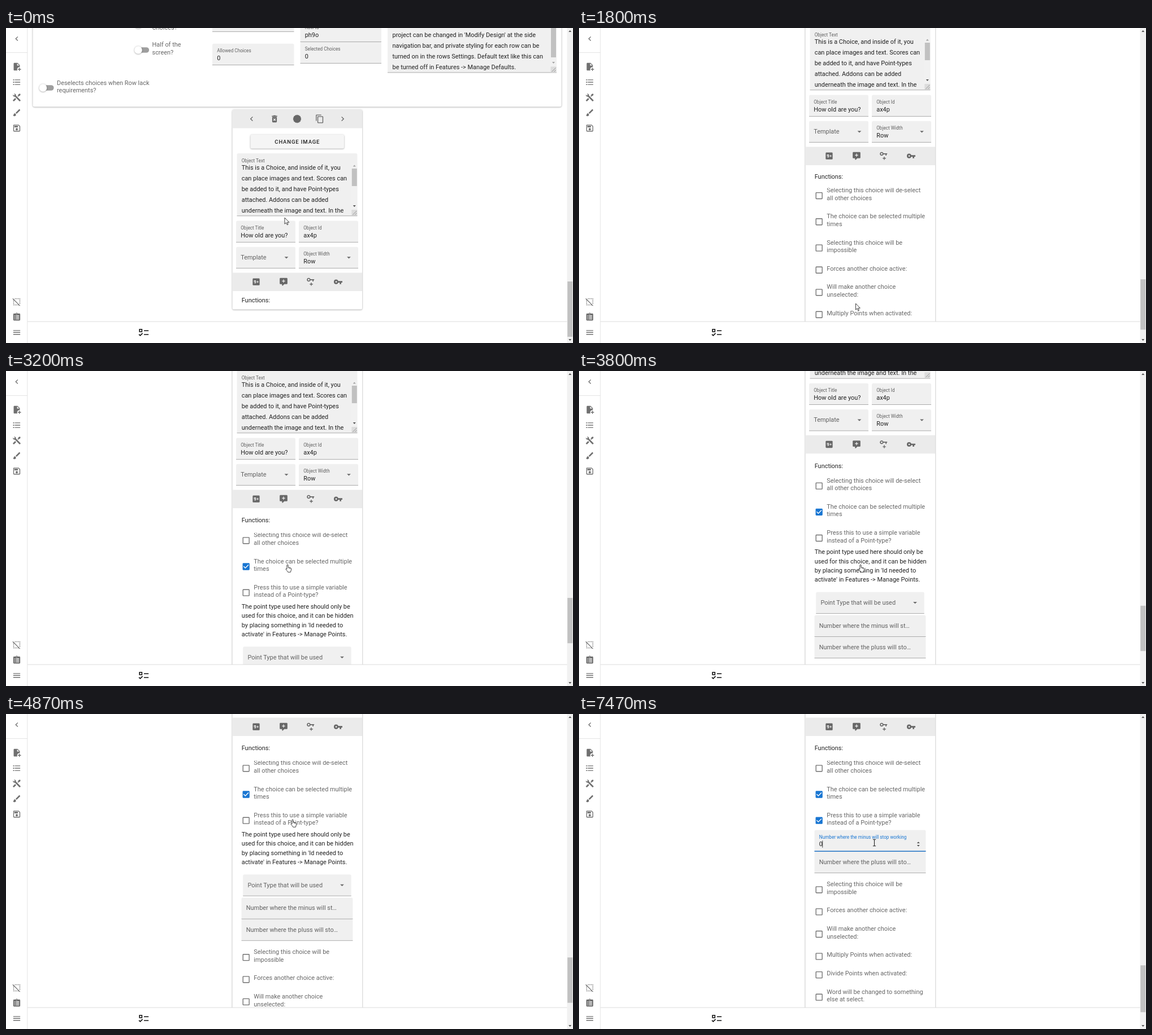
These frames come from a looping animation (1003 by 558 pixels, 8 s). An HTML page:

```html
<!DOCTYPE html>
<html lang="en">
<head>
<meta charset="utf-8">
<title>Choice editor</title>
<style>
html, body { margin: 0; width: 100%; height: 100%; overflow: hidden; background: #fff; }
svg { display: block; font-family: Roboto, Arial, sans-serif; font-size: 10.93px; }
text { fill: rgba(0,0,0,.87); white-space: pre; }
.grey { fill: rgba(0,0,0,.6); }
.small { font-size: 8.2px; }
.icon { fill: rgba(0,0,0,.56); }
.fill { fill: rgba(0,0,0,.06); }
.rule { fill: rgba(0,0,0,.42); }
.bar { fill: #ebebeb; }
.thumb { fill: #c1c1c1; }
.card { fill: #fff; filter: drop-shadow(0 1.2px 1px rgba(0,0,0,.2)) drop-shadow(0 .5px 1.6px rgba(0,0,0,.2)); }
.button { fill: #f5f5f5; filter: drop-shadow(0 1.2px 1px rgba(0,0,0,.22)) drop-shadow(0 .5px 1.6px rgba(0,0,0,.14)); }
</style>
</head>
<body>
<svg id="stage" width="1003" height="558" viewBox="0 0 1003 558"></svg>
<script>
const LOOP = 8000, STEP = 1000 / 15;
const BLUE = '#1976d2';

const ICONS = {
  left: 'M15.41 16.58L10.83 12L15.41 7.41L14 6L8 12L14 18Z',
  right: 'M8.59 16.58L13.17 12L8.59 7.41L10 6L16 12L10 18Z',
  filePlus: 'M14 2H6C4.89 2 4 2.89 4 4V20C4 21.11 4.89 22 6 22H13.81C13.28 21.09 13 20.05 13 19C13 15.69 15.69 13 19 13C19.34 13 19.67 13.03 20 13.08V8L14 2M13 9V3.5L18.5 9H13M23 20H20V23H18V20H15V18H18V15H20V18H23V20Z',
  list: 'M7 5H21V7H7ZM7 11H21V13H7ZM7 17H21V19H7ZM2.6 4.6H5.4V7.4H2.6ZM2.6 10.6H5.4V13.4H2.6ZM2.6 16.6H5.4V19.4H2.6Z',
  tools: 'M21.71 20.29L20.29 21.71A1 1 0 0 1 18.88 21.71L7 9.85A3.81 3.81 0 0 1 6 10A4 4 0 0 1 2.22 4.7L4.76 7.24L7.24 4.76L4.7 2.22A4 4 0 0 1 10 6A3.81 3.81 0 0 1 9.85 7L21.71 18.88A1 1 0 0 1 21.71 20.29M2.29 18.88A1 1 0 0 0 2.29 20.29L3.71 21.71A1 1 0 0 0 5.12 21.71L10.59 16.25L7.76 13.42M20 2L16 4V6L13.83 8.17L15.83 10.17L18 8H20L22 4Z',
  brush: 'M20.71 4.63L19.37 3.29C19 2.9 18.35 2.9 17.96 3.29L9 12.25L11.75 15L20.71 6.04C21.1 5.65 21.1 5 20.71 4.63M7 14A3 3 0 0 0 4 17C4 18.31 2.84 19 2 19C2.92 20.22 4.5 21 6 21A4 4 0 0 0 10 17A3 3 0 0 0 7 14Z',
  save: 'M17 3H5C3.89 3 3 3.9 3 5V19C3 20.1 3.89 21 5 21H19C20.1 21 21 20.1 21 19V7L17 3M19 19H5V5H16.17L19 7.83V19M12 12A3 3 0 0 0 12 18A3 3 0 0 0 12 12M6 6H15V10H6Z',
  selectOff: 'M1 4.27L2.28 3L21 21.72L19.73 23L17 20.27V21H15V19H15.73L5 8.27V9H3V7H3.73ZM20 3A1 1 0 0 1 21 4V5H19V3ZM15 3H17V5H15ZM11 3H13V5H11ZM7 3H9V5H7ZM11 19H13V21H11ZM7 19H9V21H7ZM4 21A1 1 0 0 1 3 20V19H5V21ZM3 15H5V17H3ZM19 15H21V17H19ZM3 11H5V13H3ZM19 11H21V13H19ZM19 7H21V9H19Z',
  clipboard: 'M19 3H14.82C14.4 1.84 13.3 1 12 1S9.6 1.84 9.18 3H5C3.9 3 3 3.9 3 5V19C3 20.1 3.9 21 5 21H19C20.1 21 21 20.1 21 19V5C21 3.9 20.1 3 19 3M12 3A1 1 0 0 1 12 5A1 1 0 0 1 12 3M6 8H8V10H6ZM10 8H18V10H10ZM6 12H8V14H6ZM10 12H18V14H10ZM6 16H8V18H6ZM10 16H18V18H10Z',
  menu: 'M3 6H21V8H3ZM3 11H21V13H3ZM3 16H21V18H3Z',
  remove: 'M6 19A2 2 0 0 0 8 21H16A2 2 0 0 0 18 19V7H6V19M8.46 11.88L9.87 10.47L12 12.59L14.12 10.47L15.53 11.88L13.41 14L15.53 16.12L14.12 17.53L12 15.41L9.88 17.53L8.47 16.12L10.59 14ZM15.5 4L14.5 3H9.5L8.5 4H5V6H19V4Z',
  copy: 'M19 21H8V7H19M19 5H8A2 2 0 0 0 6 7V21A2 2 0 0 0 8 23H19A2 2 0 0 0 21 21V7A2 2 0 0 0 19 5M16 1H4A2 2 0 0 0 2 3V17H4V3H16Z',
  ninePlus: 'M5 3H19A2 2 0 0 1 21 5V19A2 2 0 0 1 19 21H5A2 2 0 0 1 3 19V5A2 2 0 0 1 5 3Z',
  comment: 'M9 22A1 1 0 0 1 8 21V18H4A2 2 0 0 1 2 16V4C2 2.89 2.9 2 4 2H20A2 2 0 0 1 22 4V16A2 2 0 0 1 20 18H13.9L10.2 21.71C10 21.9 9.75 22 9.5 22H9M11 6V9H8V11H11V14H13V11H16V9H13V6Z',
  key: 'M7 14A2 2 0 0 1 7 10A2 2 0 0 1 7 14M12.6 10C11.8 7.7 9.6 6 7 6A6 6 0 0 0 7 18C9.6 18 11.8 16.3 12.6 14H16V18H20V14H23V10Z',
  down: 'M7 10L12 15L17 10Z',
  box: 'M19 3H5A2 2 0 0 0 3 5V19A2 2 0 0 0 5 21H19A2 2 0 0 0 21 19V5A2 2 0 0 0 19 3M19 5V19H5V5Z',
  ticked: 'M10 17L5 12L6.41 10.58L10 14.17L17.59 6.58L19 8ZM19 3H5A2 2 0 0 0 3 5V19A2 2 0 0 0 5 21H19A2 2 0 0 0 21 19V5A2 2 0 0 0 19 3Z'
};
ICONS.seal = 'M' + Array.from({ length: 28 }, (_, i) => {
  const a = i * Math.PI / 14, r = i % 2 ? 9.6 : 11;
  return (12 + r * Math.sin(a)).toFixed(2) + ' ' + (12 - r * Math.cos(a)).toFixed(2);
}).join('L') + 'Z';

// Drawing helpers; text and icons are placed by their vertical centre
const rect = (x, y, w, h, cls, more = '') => `<rect x="${x}" y="${y}" width="${w}" height="${h}" class="${cls}" ${more}/>`;
const text = (x, y, s, cls = '', more = '') =>
  `<text x="${x}" y="${y + (cls.includes('small') ? 2.9 : 3.8)}" class="${cls}" ${more}>${s.replace(/>/g, '&gt;')}</text>`;
const lines = (x, y, gap, list, cls) => list.map((s, i) => text(x, y + i * gap, s, cls)).join('');
const place = (x, y, inner, more = '') => `<g transform="translate(${x - 8.2} ${y - 8.2}) scale(.683)" ${more}>${inner}</g>`;
const icon = (name, x, y, more = '') => place(x, y, `<path class="icon" fill-rule="evenodd" d="${ICONS[name]}"/>`, more);
const stroke = (d, color, w, more = '') => `<path d="${d}" fill="none" stroke="${color}" stroke-width="${w}" ${more}/>`;
const tri = (x, y, w, h, color) => `<path d="M${x - w / 2} ${y}h${w}l${-w / 2} ${h}z" fill="${color}"/>`;

const slab = (x, y, w, h) =>
  `<path class="fill" d="M${x} ${y + h}V${y + 2.5}q0-2.5 2.5-2.5h${w - 5}q2.5 0 2.5 2.5V${y + h}z"/>` + rect(x, y + h - .7, w, .7, 'rule');
const field = (x, y, w, label, value) =>
  slab(x, y, w, 38.2) + text(x + 8.2, y + 12.3, label, 'small grey') + text(x + 8.2, y + 25.2, value);
const hint = (x, y, w, label) => slab(x, y, w, 38.2) + text(x + 8.2, y + 18.5, label, 'grey');

function toggle(x, y) {
  return rect(x - 5.5, y - 4.8, 24.6, 9.6, '', 'rx="4.8" fill="#9e9e9e"') +
    `<circle cx="${x}" cy="${y}" r="6.8" class="card"/>`;
}

function grip(x, y) {
  return rect(x, y, 10, 10, '', 'fill="#dcdcdc"') + stroke(`M${x + 2} ${y + 9}l7-7M${x + 6} ${y + 9}l3-3`, '#777', .7);
}

function option(y, list, id) {
  const by = y + (list.length > 1 ? 9.7 : 2.8);
  const tick = id ? place(424.7, by, `<path fill="${BLUE}" fill-rule="evenodd" d="${ICONS.ticked}"/>`, `id="${id}On"`) : '';
  return icon('box', 424.7, by, id ? `id="${id}Off"` : '') + tick + lines(438.3, y, 13.6, list, 'grey');
}

const rowEditor = rect(47.5, -40, 935, 179.5, 'card', 'rx="3"') +
  toggle(234, -6) + toggle(234, 39) + toggle(65.5, 106) +
  text(258.5, -1, 'Choices?', 'grey') +
  lines(258.5, 29.5, 13.6, ['Half of the', 'screen?'], 'grey') +
  lines(90, 96.7, 13.6, ['Deselects choices when Row lack', 'requirements?'], 'grey') +
  slab(365, -31.5, 144.5, 38.2) + field(365, 27.7, 144.5, 'Allowed Choices', '0') +
  field(520.5, -13.5, 143.5, 'Row Id', 'ph9o') + field(520.5, 24.7, 143.5, 'Selected Choices', '0') +
  slab(675, -60, 299, 139.3) +
  lines(683.5, 12, 19.1, ["project can be changed in 'Modify Design' at the side",
    'navigation bar, and private styling for each row can be',
    'turned on in the rows Settings. Default text like this can',
    'be turned off in Features -> Manage Defaults.']) +
  rect(963.5, -20, 10, 88, '', 'fill="#f1f1f1"') + rect(964, -20, 9, 72, 'thumb') +
  tri(968.5, 60, 5, 3, '#a3a3a3') + grip(963.5, 68.5);

const choiceTop = rect(400.5, 145, 229.5, 32.5, 'bar') +
  icon('left', 434.5, 161) + icon('remove', 475, 161) + icon('seal', 515, 161) + icon('copy', 555, 161) + icon('right', 595.5, 161) +
  rect(432.5, 189, 165.5, 24.5, 'button', 'rx="2.5"') +
  `<text x="475.3" y="204.5" font-size="9.56" font-weight="500" letter-spacing=".853">CHANGE IMAGE</text>` +
  slab(408.5, 222, 213, 111.2) + text(416.7, 234.6, 'Object Text', 'small grey') +
  lines(416.7, 247, 19.1, ['This is a Choice, and inside of it, you', 'can place images and text. Scores can',
    'be added to it, and have Point-types', 'attached. Addons can be added', 'underneath the image and text. In the']) +
  rect(611.3, 239, 10, 83, '', 'fill="#f1f1f1"') + rect(611.8, 249, 9, 31, 'thumb') +
  tri(616.3, 245.5, 5, -3, '#a3a3a3') + tri(616.3, 314, 5, 3, '#505050') + grip(611.3, 322) +
  field(407, 341.5, 105, 'Object Title', 'How old are you?') + field(518, 341.5, 105, 'Object Id', 'ax4p') +
  hint(407, 387.8, 105, 'Template') + field(518, 387.8, 105, 'Object Width', 'Row') +
  icon('down', 496, 406.5) + icon('down', 606.5, 406.5) +
  rect(400.5, 433.5, 229.5, 32.5, 'bar') +
  icon('ninePlus', 442.5, 449.7) + place(442.5, 449.7, stroke('M7 15H10.6V9H7.2V12H10.6M13 12H18.4M15.7 9.3V14.7', '#ebebeb', 1.6)) +
  icon('comment', 491, 449.7) +
  place(539, 449.7, stroke('M10.3 6.5A3.5 3.5 0 1 1 10.3 6.4H21M18 6.5V10.8', 'rgba(0,0,0,.56)', 2.5) + stroke('M9.5 18H17.5M13.5 14V22', 'rgba(0,0,0,.56)', 2)) +
  icon('key', 587.5, 449.7);

const minusField = `<g id="slot">${slab(416.5, 752.2, 197, 38.2)}</g>` +
  `<text id="minus" x="424.8"></text><text id="typed" x="424.8" y="781.2">0</text>` +
  `<g id="spin">${tri(600.3, 775.8, 5, -2.8, '#505050')}${tri(600.3, 778.8, 5, 2.8, '#505050')}</g>` +
  `<rect id="line" y="789.2" height="1.4" fill="${BLUE}"/><rect id="caret" y="771" width=".8" height="12.5" fill="#111"/>`;

const panel = option(513.6, ['Selecting this choice will de-select', 'all other choices']) +
  option(559.8, ['The choice can be selected multiple', 'times'], 'multi') +
  `<g id="extra">` + option(606, ['Press this to use a simple variable', 'instead of a Point-type?'], 'simple') +
  `<g id="points">` + lines(416.7, 640.2, 16.35, ['The point type used here should only be',
    'used for this choice, and it can be hidden', "by placing something in 'Id needed to", "activate' in Features -> Manage Points."]) +
  hint(419.2, 711.3, 191.5, 'Point Type that will be used') + icon('down', 594.5, 730) + `</g>` +
  `<g id="numbers">${minusField}${hint(416.5, 790.4, 197, 'Number where the pluss will sto…')}</g></g>` +
  `<g id="rest">` + option(606.2, ['Selecting this choice will be', 'impossible']) +
  option(652.2, ['Forces another choice active:']) +
  option(684.9, ['Will make another choice', 'unselected:']) +
  option(731.2, ['Multiply Points when activated:']) +
  option(763.9, ['Divide Points when activated:']) +
  option(796.6, ['Word will be changed to something', 'else at select.']) + `</g>`;

const side = rect(0, 0, 38, 558, '', 'fill="#fff"') + rect(37.4, 0, .8, 558, '', 'fill="#dedede"') + rect(0, 43, 38, .8, '', 'fill="#dedede"') +
  [['left', 19], ['filePlus', 68.5], ['list', 96], ['tools', 123], ['brush', 150], ['save', 177.3], ['selectOff', 485], ['clipboard', 512], ['menu', 539.3]]
    .map(([name, y]) => icon(name, 19, y)).join('');

const footer = rect(38, 520, 955, 38, '', 'fill="#fff"') + rect(38, 519.6, 955, .9, '', 'fill="#d8d8d8"') +
  stroke('M236.2 533.8h4.2v4.2h-4.2zM244 536.3h8.2M244 543h8.2M235.2 542.6l2.2 2.2l4.2-4.2', '#111', 1.6);

const scrollbar = rect(992.5, 0, 10.5, 558, '', 'fill="#f1f1f1"') +
  tri(997.7, 7, 5, -3, '#505050') + tri(997.7, 551, 5, 3, '#505050') + rect(993.2, 0, 9, 90, 'thumb', 'id="bar"');

const cursors =
  `<path id="arrow" d="M0 0V11.2L2.6 8.8L4.3 12.7L6 12L4.4 8.2H7.8Z" fill="#fff" stroke="#111" stroke-width=".8"/>` +
  `<g id="hand"><path d="M-1.1 1c0-1.4 2.2-1.4 2.2 0V5l4.3 .9c1 .3 1.5 1 1.3 2l-.6 3c-.2.8-.5 1.2-.8 2.4H.7C.2 12-2.3 9.4-2.9 8.4c-.5-1 .6-1.7 1.3-.9l.5.6z" fill="#fff" stroke="#111" stroke-width=".8"/>` +
  stroke('M2.9 5.6v1.6M4.8 6v1.4', '#111', .6) + `</g>` +
  stroke('M-2.6-5.8H-1Q0-5.8 0-4.9Q0-5.8 1-5.8H2.6M0-5V5M-2.6 5.8H-1Q0 5.8 0 4.9Q0 5.8 1 5.8H2.6', '#222', 1.1, 'id="beam"');

document.getElementById('stage').innerHTML =
  `<defs><clipPath id="open"><rect id="clip" x="400" y="466" width="231" height="0"/></clipPath></defs>` +
  `<g id="page">${rowEditor}${rect(400.5, 145, 229.5, 353.5, 'card', 'id="card" rx="2.5"')}${choiceTop}` +
  `<text id="head" x="416.7">Functions:</text><g clip-path="url(#open)"><g id="panel">${panel}</g></g></g>` +
  footer + side + scrollbar + `<g id="cursor">${cursors}</g>`;

const el = id => document.getElementById(id);
const set = (id, attrs) => { for (const k in attrs) el(id).setAttribute(k, attrs[k]); };
const move = (id, x, y) => set(id, { transform: `translate(${x} ${y})` });
const show = (id, on) => { el(id).style.display = on ? '' : 'none'; };

// Straight lines between [time, value, ...] keys
function track(keys, t, col = 1) {
  const i = keys.findIndex(k => k[0] > t);
  if (i < 0) return keys[keys.length - 1][col];
  if (!i) return keys[0][col];
  const a = keys[i - 1], b = keys[i];
  return a[col] + (b[col] - a[col]) * (t - a[0]) / (b[0] - a[0]);
}

const OPEN = [[1533, 0], [1600, .01], [1667, .25], [1733, .52], [1800, .7], [1867, .82], [1933, .88], [2067, .94], [2133, 1]];
const SCROLL = [[1600, 0], [1667, 105], [1733, 223], [3600, 223], [3667, 247], [3733, 284], [3800, 319.5], [3867, 346], [3933, 358],
  [4000, 361], [4067, 368], [4133, 388], [4200, 407], [4267, 419], [4333, 425], [4400, 426.5], [4467, 427]];
const POINTER = [[733, 493, 336], [933, 493, 352], [1333, 490.5, 460], [1600, 489.5, 488], [2000, 489.5, 488], [2200, 493, 425],
  [2467, 498, 343], [4000, 498, 343], [4133, 502, 313], [4333, 506, 240], [4467, 507, 203], [4867, 507, 187],
  [5667, 507, 187], [5800, 513, 203], [6000, 522.5, 228]];

function draw(time) {
  const t = Math.floor((time + 5) / STEP) * STEP + .5;
  const open = track(OPEN, t), scroll = track(SCROLL, t);
  const multi = t > 3060, extra = t > 3130, simple = t > 5260, compact = t > 5330;
  const grow = extra ? (compact ? 122.4 : 242.3) : 0;

  move('page', 0, -scroll);
  set('card', { height: 353.5 + 431 * open + grow });
  set('head', { y: 485.8 + 5.5 * open });
  move('panel', 0, -10.9 * (1 - open));
  set('clip', { y: 498.8 + 10.9 * open, height: open ? 420 * open + grow : 0 });
  show('multiOn', multi); show('multiOff', !multi);
  show('simpleOn', simple); show('simpleOff', !simple);
  show('extra', extra); show('points', !compact);
  move('numbers', 0, compact ? -119.8 : 0);
  move('rest', 0, grow);

  const pageHeight = 3052 + 431 * open + grow;
  set('bar', { y: 11 + 536 * (2494 + scroll) / pageHeight, height: 536 * 558 / pageHeight });

  const focused = t > 6195, hover = t > 5860;
  const f = focused ? 1 - (1 - Math.min(1, (t - 6160) / 370)) ** 2.5 : 0;
  const size = 10.93 - 2.73 * f;
  el('minus').textContent = 'Number where the minus will st' + (f > .4 ? 'op working' : '…');
  set('minus', { y: 770.7 - 6.1 * f + size * .347, style: `font-size:${size}px;fill:${focused ? BLUE : 'rgba(0,0,0,.6)'}` });
  el('slot').firstChild.style.fillOpacity = hover && !focused ? 2 : 1;
  el('slot').firstChild.style.fill = hover && !focused ? 'rgba(0,0,0,.12)' : '';
  set('line', { x: 515 - 98.5 * f, width: 197 * f });
  const typed = t > 7460;
  show('spin', hover); show('typed', typed);
  show('caret', focused && !(t > 6725 && t < 7260));
  set('caret', { x: typed ? 430.4 : 424.4 });

  move('cursor', track(POINTER, t), track(POINTER, t, 2));
  const kind = t < 2390 ? 'arrow' : hover ? 'beam' : 'hand';
  for (const c of ['arrow', 'hand', 'beam']) show(c, c === kind);
}

const start = performance.now();
function tick() {
  draw((performance.now() - start) % LOOP);
  requestAnimationFrame(tick);
}
tick();
</script>
</body>
</html>
```
